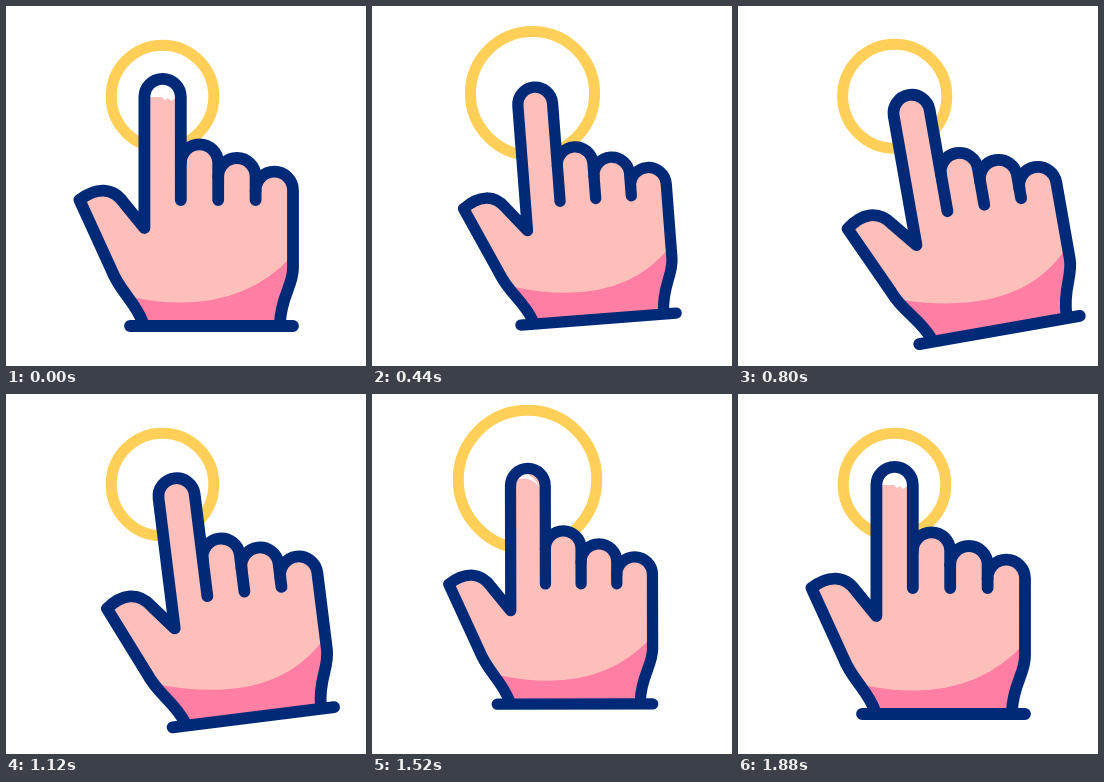
An HTML page that plays this animation: 360x360 px, repeating every 2000 ms.

```html
<!DOCTYPE html>
<html lang="en">
<head>
<meta charset="utf-8">
<title>Tapping hand</title>
<style>
  html, body { margin: 0; width: 100%; height: 100%; overflow: hidden; background: #fff; }
  svg { display: block; width: 100vw; height: 100vh; }
  .line { fill: none; stroke: #002a78; stroke-width: 11.8; stroke-linecap: round; stroke-linejoin: round; }
</style>
</head>
<body>
<svg viewBox="0 0 360 360">
  <circle id="ring" fill="none" stroke="#ffcf57" stroke-width="11"/>
  <g id="hand">
    <path id="skin" fill="#fdbfba"/>
    <path id="cuff" fill="#ff7ea3"/>
    <path id="cap" fill="#fff" d="M139 91a17.5 17.5 0 0 1 35 0l-6 2-3 2-3-3-3 2-3-3-8 0Z"/>
    <path id="glint" fill="#fff" d="M145 84Q157 70 169 93Q161 81 145 84Z"/>
    <path id="outline" class="line"/>
    <path id="folds" class="line"/>
  </g>
</svg>
<script>
const LOOP = 2000, STEP = 40;
const TIP = { x: 156.5, y: 90.5 };
const $ = id => document.getElementById(id);

// Three bent fingers, each a step to the right and lower.
const GAP = 37.4;
let knuckles = "", folds = "M124 320H287";
for (let i = 0; i < 3; i++) {
  const x = 174.8 + GAP * i, y = 157 + 13.7 * i;
  knuckles += `V${y}a${GAP / 2} ${GAP / 2} 0 0 1 ${GAP} 0`;
  folds += `M${x} ${y}V194`;
}
const contour = "M137 317C129 295 114 286 105.5 264L73.5 194C90 181 107 181 118 197L138.4 222" +
  "V91a18.2 18.2 0 0 1 36.4 0" + knuckles + "V262C287 280 275 290 274 317";
$("outline").setAttribute("d", contour);
$("skin").setAttribute("d", contour + "Z");
$("folds").setAttribute("d", folds);

// Eased rise from 0 to 1, and a rise followed by a fall.
function ramp(t, from, to) {
  const p = Math.min(1, Math.max(0, (t - from) / (to - from)));
  return (1 - Math.cos(Math.PI * p)) / 2;
}
const bump = (t, from, peak, to) => ramp(t, from, peak) - ramp(t, peak, to);

function draw(t) {
  const turn = ramp(t, 117, 817) - ramp(t, 866, 1568);
  const press = 0.075 * bump(t, 120, 300, 620) + 0.085 * bump(t, 1100, 1340, 1720);
  const x = TIP.x + 17 * turn - 20 * press + 2 * bump(t, 900, 1100, 1240);
  const y = TIP.y + 16 * turn + 12 * press;
  $("hand").setAttribute("transform",
    `translate(${x} ${y}) rotate(${-10 * turn}) scale(${1 - press}) translate(${-TIP.x} ${-TIP.y})`);

  const lift = Math.sqrt(turn);
  $("cuff").setAttribute("d",
    `M${130 - 14 * lift} ${292 - 18 * lift}Q230 311 286 250V262C287 280 275 290 274 318H137Z`);

  const first = bump(t, 270, 574, 834), second = bump(t, 1195, 1500, 1760);
  const grow = first + second;
  $("ring").setAttribute("cx", TIP.x + 4 * bump(t, 120, 440, 860) - second);
  $("ring").setAttribute("cy", TIP.y - 5 * grow);
  $("ring").setAttribute("r", 51.3 + 18.2 * grow);

  const resting = t < 120 || t >= 1840;
  $("cap").style.display = resting ? "" : "none";
  $("glint").style.display = !resting && t >= 1440 ? "" : "none";
}

const start = performance.now();
function tick() {
  const t = (performance.now() - start) % LOOP;
  draw(Math.floor(t / STEP) * STEP);
  requestAnimationFrame(tick);
}
tick();
</script>
</body>
</html>
```
